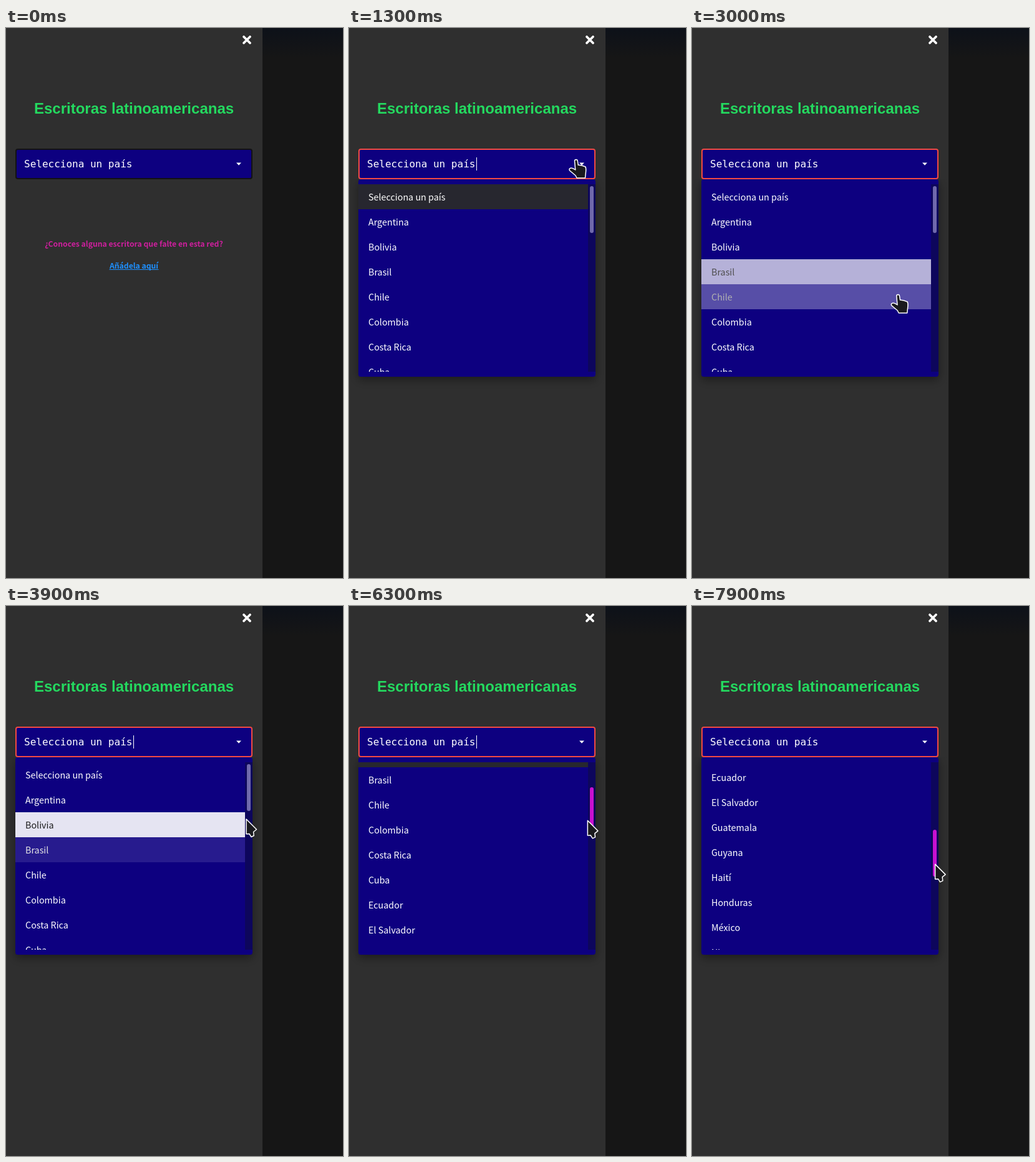
Recreate the animation shown at these times as an HTML page with a canvas. Size 540 px wide and 880 px high, loop 8000 ms.

```html
<!DOCTYPE html>
<html lang="es">
<head>
<meta charset="utf-8">
<title>Escritoras latinoamericanas</title>
<style>
html, body { margin: 0; width: 100%; height: 100%; overflow: hidden; background: #161616; }
canvas { display: block; }
</style>
</head>
<body>
<canvas id="stage" width="540" height="880"></canvas>
<script>
const ctx = document.getElementById('stage').getContext('2d');
const LOOP = 8000, STEP = 100, FADE = 300;
const OPEN = 1200, PRESS = 4700, DRAG = 5202;
const ROW = 40, LIST_TOP = 250, LIST_H = 300, RAIL_X = 384;
const BLUE = '#0d0080';
const SANS = '"Noto Sans CJK JP", "Noto Sans CJK SC", "Noto Sans CJK", "Noto Sans", sans-serif';
const MONO = '"DejaVu Sans Mono", monospace';

const rows = ['Selecciona un país', 'Argentina', 'Bolivia', 'Brasil', 'Chile', 'Colombia',
  'Costa Rica', 'Cuba', 'Ecuador', 'El Salvador', 'Guatemala', 'Guyana', 'Haití',
  'Honduras', 'México', 'Nicaragua', 'Panamá', 'Paraguay', 'Perú'];

// Pointer strokes: start time, end time, goal, ease-out power
const START = { x: 515, y: 238 };
const strokes = [
  { from: 200, to: 900, x: 364, y: 210, pow: 1.5 },
  { from: 1300, to: 2400, x: 320, y: 342, pow: 1 },
  { from: 2400, to: 3100, x: 332, y: 440, pow: 1 },
  { from: 3400, to: 3900, x: 384, y: 340, pow: 1.7 },
  { from: 3900, to: 4300, x: 392, y: 310, pow: 1.5 },
  { from: 4300, to: 4400, x: 387, y: 304, pow: 1 }
];

const clamp = v => Math.min(1, Math.max(0, v));

function ramp(ms) {
  const k = clamp(ms / FADE);
  return k * k * (3 - 2 * k);
}

// The drag speeds up slightly
function scrollAt(t) {
  const u = Math.max(0, t - DRAG) / 1000;
  return Math.round(u * (91 + 9.7 * u));
}

const thumbShift = t => scrollAt(t) / 3.01;

function pointerAt(t) {
  let { x, y } = START;
  for (const s of strokes) {
    const k = 1 - (1 - clamp((t - s.from) / (s.to - s.from))) ** s.pow;
    x += (s.x - x) * k;
    y += (s.y - y) * k;
  }
  if (t > DRAG) {
    x -= 6 * Math.sin(Math.PI * (t - DRAG - 200) / 2300);
    y += thumbShift(t) * 1.03;
  }
  return { x, y };
}

function rowAt(t) {
  const { x, y } = pointerAt(t);
  const over = t >= OPEN && t < PRESS && x < RAIL_X && y >= LIST_TOP;
  return over ? Math.floor((y - LIST_TOP) / ROW) : -1;
}

function findHovers() {
  const spans = [];
  let last = -1;
  for (let t = OPEN; t < PRESS; t += 10) {
    const row = rowAt(t);
    if (row === last) continue;
    if (last >= 0) spans[spans.length - 1].to = t;
    if (row >= 0) spans.push({ row, from: t, to: Infinity });
    last = row;
  }
  return spans;
}

// A row stays marked while nothing is hovered
const hovers = findHovers();
const final = hovers[hovers.length - 1];
const marked = [
  { row: 0, from: -FADE, to: hovers[0].from },
  { row: final.row, from: final.to, to: Infinity }
];

function level(spans, row, t) {
  const levels = spans.filter(s => s.row === row)
    .map(s => ramp(t - s.from) * (1 - ramp(t - s.to)));
  return Math.max(0, ...levels);
}

function rect(x, y, w, h, color) {
  ctx.fillStyle = color;
  ctx.fillRect(x, y, w, h);
}

function box(x, y, w, h, r, color) {
  ctx.beginPath();
  ctx.roundRect(x, y, w, h, r);
  ctx.fillStyle = color;
  ctx.fill();
}

function clipTo(x, y, w, h) {
  ctx.beginPath();
  ctx.rect(x, y, w, h);
  ctx.clip();
}

function label(str, x, y, font, color, align = 'left') {
  ctx.font = font;
  ctx.fillStyle = color;
  ctx.textAlign = align;
  ctx.fillText(str, x, y);
}

function drawPage() {
  rect(0, 0, 540, 880, '#161616');
  const sky = ctx.createLinearGradient(0, 0, 0, 48);
  sky.addColorStop(0, '#0d1119');
  sky.addColorStop(1, '#161616');
  rect(411, 0, 129, 48, sky);
  rect(0, 0, 411, 880, '#2f2f2f');

  ctx.strokeStyle = '#fff';
  ctx.lineWidth = 3.8;
  ctx.lineCap = 'round';
  ctx.stroke(new Path2D('M381 14L391 24M391 14L381 24'));

  label('Escritoras latinoamericanas', 205, 137,
    'bold 24px "Liberation Sans", Arial, sans-serif', '#24d95f', 'center');
  const bold = 'bold 12.2px ' + SANS;
  label('¿Conoces alguna escritora que falte en esta red?', 205, 350, bold, '#cc1f9c', 'center');
  label('Añádela aquí', 205, 385, bold, '#1e90ff', 'center');
  rect(165.5, 386, 79, 1, '#1e90ff');
}

function drawSelect(t) {
  box(15, 193, 380, 49, 4, t >= OPEN ? '#f24a42' : '#131313');
  box(17, 195, 376, 45, 2, BLUE);
  label('Selecciona un país', 29, 223, '16px ' + MONO, '#fff');
  ctx.fill(new Path2D('M369 215.5H377L373 219.7Z'));
  const caretOn = t >= OPEN && Math.floor((t - 1100) / 1200) % 2 === 0;
  if (caretOn) rect(204, 207, 1, 21, '#fff');
}

function drawRow(name, i, y, t) {
  const dark = level(marked, i, t), light = level(hovers, i, t);
  rect(15, y, 368, ROW, `rgba(39,39,47,${dark})`);
  rect(15, y, 368, ROW, `rgba(255,255,255,${light})`);
  const ink = Math.round(255 * (1 - light));
  label(name, 31, y + 26, '14.33px ' + SANS, `rgb(${ink},${ink},${ink})`);
}

function drawList(t) {
  ctx.save();
  clipTo(0, 242, 411, 400);
  ctx.shadowColor = 'rgba(0,0,0,.4)';
  ctx.shadowBlur = 15;
  ctx.shadowOffsetY = 5;
  box(15, 242, 380, 316, 4, BLUE);
  ctx.restore();

  ctx.save();
  clipTo(15, LIST_TOP, 380, LIST_H);
  rows.forEach((name, i) => drawRow(name, i, LIST_TOP + i * ROW - scrollAt(t), t));
  rect(383, LIST_TOP, 12, LIST_H, '#0d065c');
  box(386, 253 + Math.round(thumbShift(t)), 6, 75, 3, t >= PRESS ? '#c810d0' : '#7069ad');
  ctx.restore();
}

const arrow = new Path2D('M1 1L17.5 17.5L12.5 21.5L13.2 27.5L9 29.5L5.8 24.5L1 24.8Z');
const hand = new Path2D('M-2.5 3Q-2.5 .5 0 .5Q2 .5 2.3 3L3.3 9.3Q8 9 14.8 12' +
  'Q16 14 15.6 19L14.5 30L1 30L-1 26L-10.5 18Q-12 15 -9 14.2Q-6 13.6 -1.2 17Z');

function drawPointer(t) {
  if (t < strokes[0].from) return;
  const { x, y } = pointerAt(t);
  const shape = x < RAIL_X && t < PRESS ? hand : arrow;
  ctx.save();
  ctx.translate(x, y);
  ctx.fillStyle = '#1a1a1e';
  ctx.fill(shape);
  ctx.strokeStyle = '#fff';
  ctx.lineWidth = 1.5;
  ctx.lineJoin = 'round';
  ctx.stroke(shape);
  ctx.restore();
}

function frame(now) {
  const t = Math.floor((now % LOOP) / STEP) * STEP;
  drawPage();
  drawSelect(t);
  if (t >= OPEN) drawList(t);
  drawPointer(t);
  requestAnimationFrame(frame);
}
requestAnimationFrame(frame);
</script>
</body>
</html>
```
